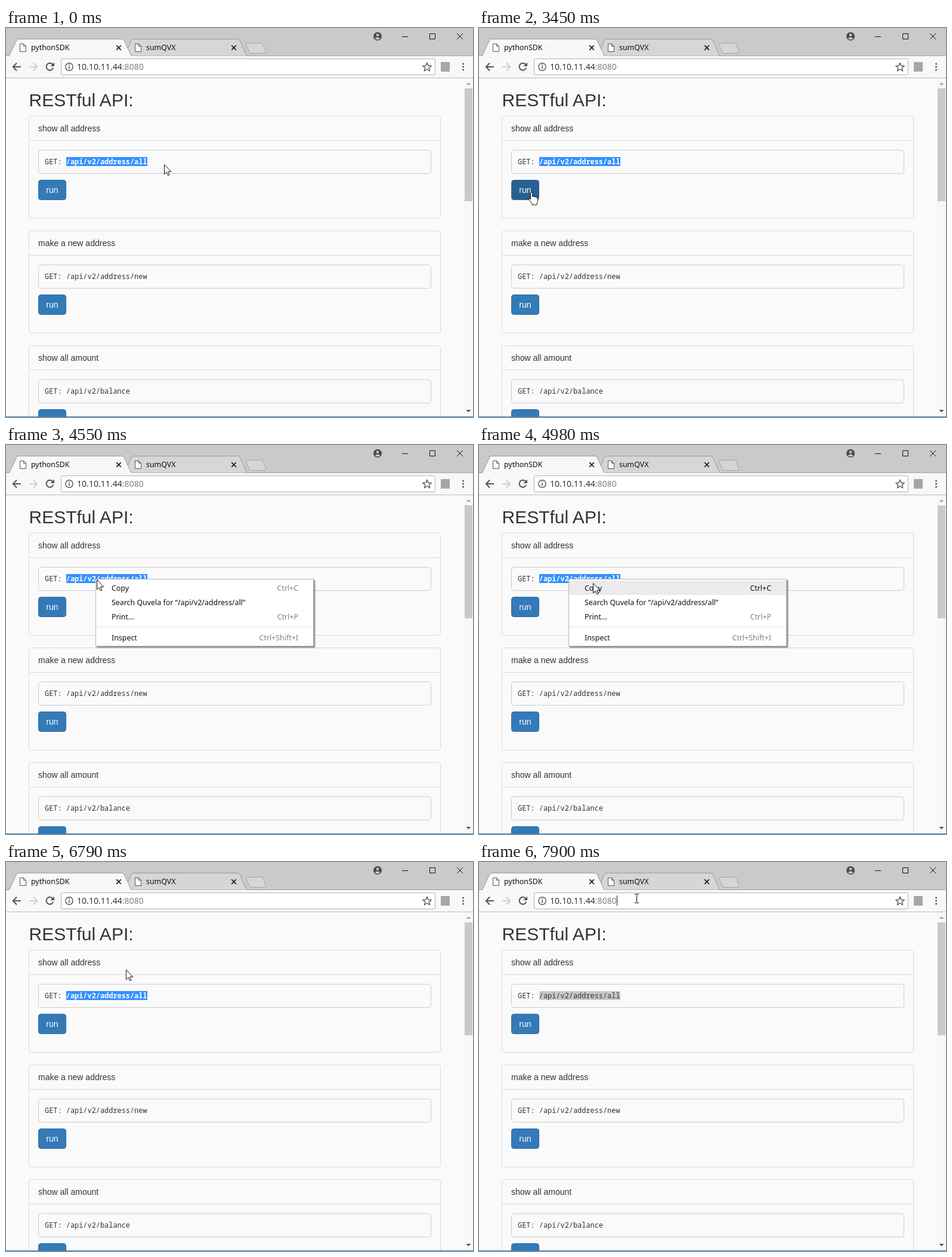
An HTML page that plays this animation: 783x651 px, repeating every 8 s.

```html
<!DOCTYPE html>
<html lang="en">
<head>
<meta charset="utf-8">
<title>RESTful API</title>
<style>
html, body { margin: 0; width: 100%; height: 100%; overflow: hidden; background: #fafafa; }
svg { display: block; width: 783px; height: 651px; }
text { white-space: pre; }
.page { font-family: "Liberation Sans", Arial, sans-serif; font-size: 14px; fill: #333; }
.code { font-family: "Noto Sans Mono", "DejaVu Sans Mono", monospace; font-size: 11.92px; fill: #333; }
.ui { font-family: "Noto Sans", "Open Sans", sans-serif; font-size: 12.4px; fill: #111; }
.url { font-family: "Noto Sans", "Open Sans", sans-serif; font-size: 14.1px; fill: #333; }
.line { fill: none; stroke: #555; stroke-width: 2; }
#ibeam { mix-blend-mode: difference; }
</style>
</head>
<body>
<svg id="stage" viewBox="0 0 783 651" xmlns="http://www.w3.org/2000/svg">
  <rect width="783" height="651" fill="#fafafa"/>

  <!-- page -->
  <text class="page" x="38.5" y="131" style="font-size:30px">RESTful API:</text>
  <g id="panels"></g>
  <rect x="768" y="84" width="15" height="566" fill="#f7f7f7"/>
  <rect x="769" y="101" width="13" height="189" fill="#c9c9c9"/>
  <path d="M771.5 95l4-4 4 4z" fill="#a5a5a5"/>
  <path d="M771.5 639l4 4 4-4z" fill="#505050"/>

  <!-- tab strip -->
  <rect width="783" height="47" fill="#cacaca"/>
  <path d="M0 46.5H783" stroke="#a3a3a3"/>
  <path d="M199 46.5L210 21q1.2-2.5 4-2.5H388q3 0 4.2 2.5L403.500 46.500" fill="#d6d6d6" stroke="#979797"/>
  <path d="M404 25.500H428q2.500 0 3.400 2.300L436 40q.7 2.500-2 2.500H411.500q-2.500 0-3.400-2.300L402.500 28q-.8-2.500 1.500-2.500z" fill="#d6d6d6" stroke="#a3a3a3"/>
  <path d="M0 47V46.500H5.500L17.500 21q1.200-2.500 4-2.500H194q3 0 4.200 2.500L210 46.500V48H0z" fill="#f8f8f8"/>
  <path d="M0 46.500H5.500L17.500 21q1.200-2.500 4-2.500H194q3 0 4.200 2.500L210 46.500" fill="none" stroke="#979797"/>
  <g id="tabs"></g>

  <!-- window buttons -->
  <circle cx="623" cy="14" r="7" fill="#4b4b4b"/>
  <circle cx="623" cy="11.700" r="2.200" fill="#cacaca"/>
  <path d="M618.700 17.500q4.300-4 8.600 0-1.700 2-4.300 2t-4.300-2z" fill="#cacaca"/>
  <path d="M664 14.500h10M710.500 9.500h9v9h-9zM756 9l10 10M766 9l-10 10" fill="none" stroke="#111"/>

  <!-- toolbar -->
  <rect y="47" width="783" height="36" fill="#f8f8f8"/>
  <path d="M0 83.500H783" stroke="#b9b9b9"/>
  <path class="line" d="M25 65H12.500M18 58.500L11.800 65l6.200 6.500"/>
  <path class="line" d="M39 65h12.500M46 58.500l6.200 6.500-6.200 6.500" style="stroke:#cfcfcf"/>
  <path class="line" d="M78.300 61a6 6 0 1 0 1 5.500"/>
  <path d="M81 57.500v6.500h-6.500z" fill="#555"/>
  <rect x="92.500" y="51.500" width="627" height="27" rx="2" fill="#fff" stroke="#b0b0b0"/>
  <circle class="line" cx="106" cy="65" r="6.200" style="stroke-width:1.400"/>
  <path class="line" d="M106 64v4.500M106 61v1.700" style="stroke-width:1.600"/>
  <rect id="urlMark" x="119" y="55" width="112" height="19" fill="#0078d7"/>
  <text class="url" x="119" y="70"><tspan id="host">10.10.11.44</tspan><tspan id="port">:8080</tspan></text>
  <path id="caret" d="M231.500 56v17" stroke="#222"/>
  <path class="line" d="M706 58.500l2 4.600 4.900.4-3.700 3.300 1.100 4.800-4.300-2.600-4.300 2.600 1.100-4.800-3.700-3.300 4.900-.4z" style="stroke-width:1.400"/>
  <rect x="729" y="57" width="15" height="16" fill="#a6a6a6"/>
  <path d="M766.500 60v.01M766.500 65v.01M766.500 70v.01" stroke="#555" stroke-width="3" stroke-linecap="round"/>

  <!-- context menu -->
  <g id="menu">
    <rect x="150.500" y="224.500" width="365" height="112" fill="#fff" stroke="#b5b5b5" style="filter:drop-shadow(2px 2px 1px rgba(0,0,0,.5))"/>
    <rect id="menuHover" x="151" y="227" width="364" height="24" fill="#ebebeb"/>
    <path d="M151 304.500h364" stroke="#e3e3e3"/>
    <g id="items"></g>
  </g>

  <path d="M0 650.500H783" stroke="#1883d7"/>

  <!-- pointers -->
  <path id="arrow" d="M.5.500V16.800L4.200 13.300 6.700 18.800 9 17.800 6.600 12.300H11.800z" fill="#fff" stroke="#111"/>
  <path id="ibeam" d="M-3-7.500h3m1 0h3M.5-7V7M-3 7.500h3m1 0h3" fill="none" stroke="#fff"/>
  <path id="hand" d="M-1.500 12V1.500q0-1.500 1.500-1.500t1.500 1.500V7q3-1 3.500.7 2.500-.7 3 .8 2.500-.5 2.500 1.500v4.500q0 2-1.500 4V21h-8v-2.500l-5.500-6.500q-.8-2 1-2z" fill="#fff" stroke="#111"/>
</svg>
<script>
const $ = id => document.getElementById(id);
const LOOP = 8000;

const panel = ([title, path], i) => `<g transform="translate(0 ${192 * i})">
  <rect x="38.5" y="147.5" width="690" height="171" rx="4" fill="none" stroke="#d9d9d9"/>
  <path d="M39 188.5H728" stroke="#d9d9d9"/>
  <text class="page" x="54" y="173">${title}</text>
  <rect x="54.5" y="204.5" width="658" height="39" rx="4" fill="none" stroke="#ccc"/>
  ${i ? '' : '<rect id="mark" x="101" y="216" width="136" height="15"/>'}
  <text class="code" x="65" y="228">GET:</text>
  <text class="code" x="100.8" y="228" id="path${i}">${path}</text>
  <rect id="run${i}" x="54.5" y="254.5" width="46" height="33" rx="4" fill="#337ab7" stroke="#2e6da4"/>
  <text class="page" x="67.300" y="276" style="fill:#fff">run</text></g>`;

const tab = ([title, x]) => `<g transform="translate(${x} 0)">
  <path d="M.5 26.500h6l4 4v9h-10zM6.500 26.500v4h4" fill="#fff" stroke="#555"/>
  <text class="ui" x="19" y="37">${title}</text>
  <path d="M162.200 29.200l7.600 7.600m0-7.600l-7.600 7.600" stroke="#222" stroke-width="1.700"/></g>`;

const item = ([label, keys, y], i) => `<text class="ui" x="177" y="${y}">${label}</text>
  <text class="ui" id="keys${i}" x="490" y="${y}" text-anchor="end" style="fill:#808080">${keys}</text>`;

$('panels').innerHTML = [
  ['show all address', '/api/v2/address/all'],
  ['make a new address', '/api/v2/address/new'],
  ['show all amount', '/api/v2/balance']
].map(panel).join('');
$('tabs').innerHTML = [['pythonSDK', 23], ['sumQVX', 216]].map(tab).join('');
$('items').innerHTML = [
  ['Copy', 'Ctrl+C', 244],
  ['Search Quvela for “/api/v2/address/all”', '', 268],
  ['Print...', 'Ctrl+P', 292],
  ['Inspect', 'Ctrl+Shift+I', 327]
].map(item).join('');

// Each run: first time, last time, pointer, then the stops spread evenly between them.
const moves = [
  [0, 0, 'arrow', [265, 228]],
  [900, 900, 'arrow', [266, 232]],
  [1650, 1650, 'arrow', [247, 229]],
  [1790, 2070, 'ibeam', [226, 224], [213, 220], [208, 219]],
  [2910, 3220, 'arrow', [188, 236], [158, 254], [122, 270]],
  [3380, 3850, 'hand', [88, 275], [72, 274], [70, 270], [76, 266]],
  [3970, 4110, 'arrow', [106, 251], [134, 237]],
  [4240, 4240, 'ibeam', [152, 225]],
  [4550, 4550, 'arrow', [152, 225]],
  [4830, 5400, 'arrow', [174, 228], [191, 231], [196, 235], [197, 237], [197, 238]],
  [6240, 7180, 'arrow', [196, 254], [197, 259], [198, 230], [201, 180], [206, 120], [210, 78], [212, 64]],
  [7480, 7900, 'ibeam', [224, 68], [244, 72], [258, 65], [264, 61]]
];
const stops = moves.flatMap(([from, to, shape, ...points]) =>
  points.map(([x, y], i) => ({ at: from + (to - from) * i / Math.max(1, points.length - 1), shape, x, y })));

const show = (id, on) => $(id).setAttribute('visibility', on ? 'visible' : 'hidden');
const fill = (id, color) => { $(id).style.fill = color; };

function draw(t) {
  const within = (a, b) => t >= a && t < b;
  const pointer = stops.findLast(s => s.at <= t + 1);
  for (const id of ['arrow', 'ibeam', 'hand']) show(id, id === pointer.shape);
  $(pointer.shape).setAttribute('transform', `translate(${pointer.x} ${pointer.y})`);

  fill('run0', pointer.shape === 'hand' ? '#286090' : '#337ab7');

  const blurred = t >= 7330;
  fill('mark', blurred ? '#c8c8c8' : '#3390ff');
  fill('path0', blurred ? '#333' : '#fff');
  $('path0').style.fontWeight = blurred ? 400 : 600;

  const copyHover = within(4830, 5940);
  show('menu', within(4550, 5940));
  $('menuHover').style.opacity = copyHover ? 1 : 0;
  fill('keys0', copyHover ? '#111' : '#808080');

  const urlSelected = within(7330, 7760);
  show('urlMark', urlSelected);
  show('caret', t >= 7760);
  fill('host', urlSelected ? '#fff' : '#333');
  fill('port', urlSelected ? '#fff' : '#808080');
}

const start = performance.now();
function tick() {
  draw((performance.now() - start) % LOOP);
  requestAnimationFrame(tick);
}
tick();
</script>
</body>
</html>
```
